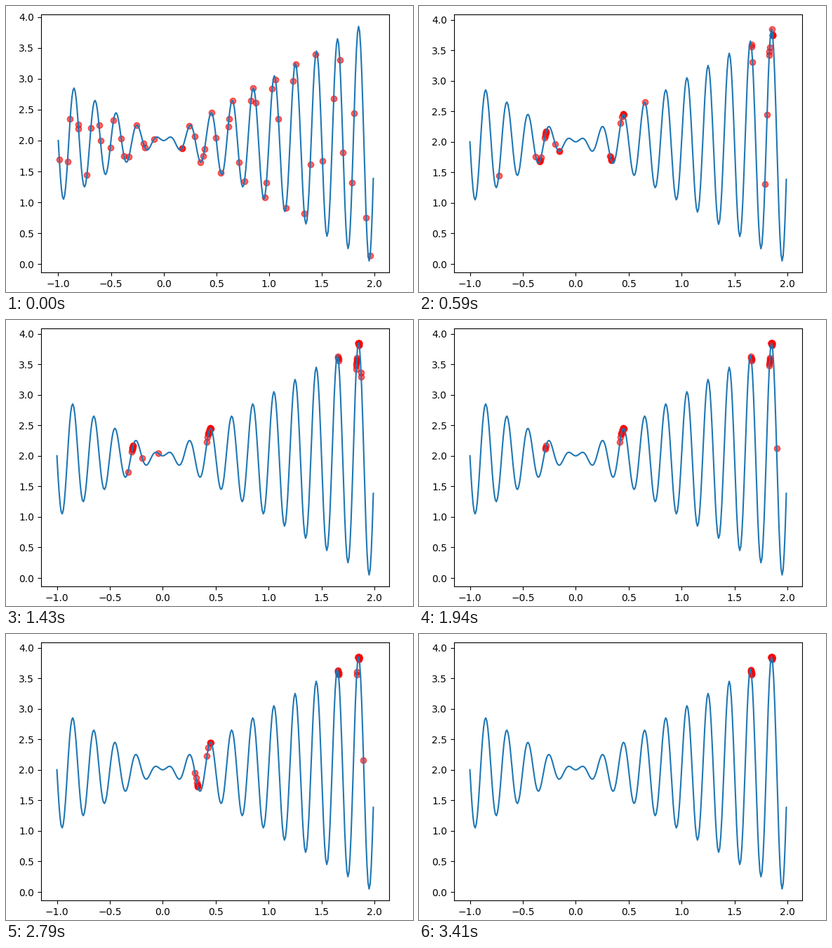
These frames come from a looping animation (580 px wide and 408 px high, 3.56 s). A matplotlib script:

```python
import numpy as np
import matplotlib.pyplot as plt
from matplotlib.animation import FuncAnimation

W, H, DPI = 580, 408, 100
LOOP, STEP = 3560, 20
GEN_MS, LAST_GEN = 83.3, 41
PEAK_GEN = 6            # first individual on the highest peak
FOUNDERS, MEAN_LIFE = 55, 5

# Niches: centre, half width, individuals, first and last generation
NICHES = [
    (-0.335, 0.008, 6, 1, 18),
    (-0.285, 0.008, 10, 1, 26),
    (-0.153, 0.005, 4, 1, 8),
    (-0.040, 0.002, 2, 9, 20),
    (0.318, 0.015, 7, 28, 40),
    (0.330, 0.006, 5, 1, 14),
    (0.437, 0.022, 14, 1, 38),
    (1.657, 0.005, 10, 2, 100),
    (1.830, 0.004, 7, 2, 36),
    (1.852, 0.005, 26, PEAK_GEN, 70),
    (1.860, 0.002, 4, 1, 12),
    (1.874, 0.002, 3, 9, 20),
    (1.897, 0.001, 2, 20, 36),
]


def fitness(x):
    return x * np.sin(10 * np.pi * x) + 2


def founders(rng):
    """Spread over the whole range, then die out at random."""
    x = np.interp(np.arange(FOUNDERS), [0, 17, 18, 41, FOUNDERS - 1],
                  [-0.99, -0.12, 0.15, 1.15, 1.96])
    x[1:-1] += rng.uniform(-0.03, 0.03, FOUNDERS - 2)
    return x, np.zeros(FOUNDERS), rng.exponential(MEAN_LIFE, FOUNDERS)


def niche(rng, centre, width, count, first, last):
    """Fills up one by one and empties in the same order."""
    x = rng.uniform(centre - width, centre + width, count)
    order = np.linspace(0, 1, count)
    ramp = 0.4 * (last - first)
    return x, first + ramp * order, last - ramp * (1 - order)


def padded(lo, hi):
    pad = 0.05 * (hi - lo)
    return lo - pad, hi + pad


rng = np.random.default_rng(4)
groups = [founders(rng)] + [niche(rng, *row) for row in NICHES]
pos, born, dies = (np.concatenate(part) for part in zip(*groups))

fig = plt.figure(figsize=(W / DPI, H / DPI), dpi=DPI)
ax = fig.add_axes([50 / W, 27.58 / H, 496 / W, 368.06 / H])
grid = np.arange(-1, 2, 0.01)
curve = fitness(grid)
ax.plot(grid, curve)
dots = ax.scatter([], [], c="red", alpha=0.6)


def draw(k):
    gen = min(int((k + 1) * STEP / GEN_MS), LAST_GEN)
    x = pos[(born <= gen) & (gen < dies)]
    dots.set_offsets(np.column_stack([x, fitness(x)]))
    # Limits make room for markers at the edge of the data
    left = 0.013 if gen == 0 else 0
    top = 0.04 if gen >= PEAK_GEN else 0
    ax.set_xlim(*padded(grid[0] - left, grid[-1]))
    ax.set_ylim(*padded(curve.min(), curve.max() + top))
    return dots,


anim = FuncAnimation(fig, draw, frames=LOOP // STEP, interval=STEP,
                     init_func=lambda: draw(0), repeat=True, repeat_delay=0)
plt.show()
```
